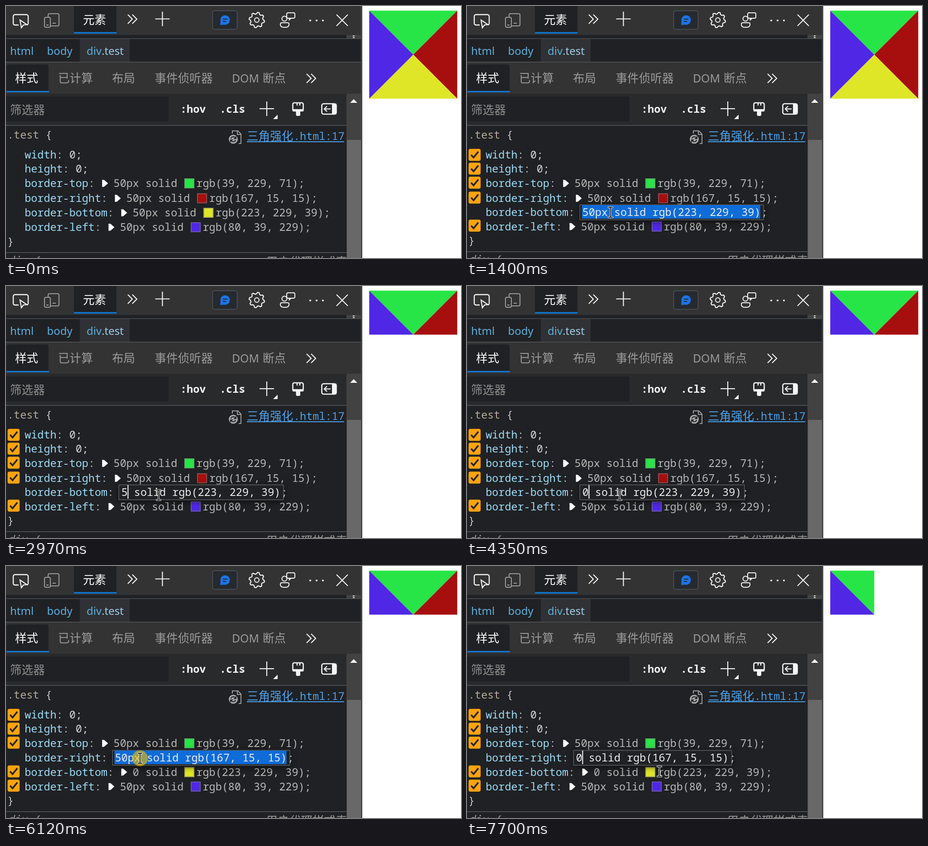
Recreate the animation shown at these times as an HTML page with a canvas. Size 1005x557 px, loop 8000 ms.

```html
<!DOCTYPE html>
<html lang="zh-CN">
<head>
<meta charset="utf-8">
<title>CSS border triangles</title>
<style>
  html, body { margin: 0; width: 100%; height: 100%; overflow: hidden; background: #fff; }
  canvas { display: block; }
</style>
</head>
<body>
<canvas id="stage" width="1005" height="557"></canvas>
<script>
const ctx = document.getElementById('stage').getContext('2d');
const LOOP = 8000;
const CW = 14.07; // width of one code character
const MONO = '23.45px "Noto Sans Mono", monospace';
const MONO_BOLD = 'bold ' + MONO;
const CJK = '25.6px "Noto Sans CJK SC", "Noto Sans CJK", sans-serif';
const SANS = '24px "Noto Sans", sans-serif';
const DARK = '#202124', BAR = '#333334', LINE = '#4b4c4f', WHITE = '#f4f4f4';
const GREY = '#9c9c9c', NAME = '#9bdcf8', VALUE = '#b9b9b9', BLUE = '#0f78d4';
const GREEN = 'rgb(39,229,71)', RED = 'rgb(167,15,15)';
const YELLOW = 'rgb(223,229,39)', VIOLET = 'rgb(80,39,229)';

function rect(x, y, w, h, color) {
  ctx.fillStyle = color;
  ctx.fillRect(x, y, w, h);
}

function round(x, y, w, h, r, fill, stroke, lw = 2) {
  ctx.beginPath();
  ctx.roundRect(x, y, w, h, r);
  if (fill) { ctx.fillStyle = fill; ctx.fill(); }
  if (stroke) { ctx.strokeStyle = stroke; ctx.lineWidth = lw; ctx.stroke(); }
}

function trace(pts, close) {
  ctx.beginPath();
  for (let i = 0; i < pts.length; i += 2) ctx.lineTo(pts[i], pts[i + 1]);
  if (close) ctx.closePath();
}

function line(pts, color = WHITE, lw = 2.2) {
  trace(pts);
  ctx.strokeStyle = color;
  ctx.lineWidth = lw;
  ctx.stroke();
}

function poly(pts, color) {
  trace(pts, true);
  ctx.fillStyle = color;
  ctx.fill();
}

function disc(x, y, r, fill, stroke, lw = 2) {
  ctx.beginPath();
  ctx.arc(x, y, r, 0, 7);
  if (fill) { ctx.fillStyle = fill; ctx.fill(); }
  if (stroke) { ctx.strokeStyle = stroke; ctx.lineWidth = lw; ctx.stroke(); }
}

function text(s, x, y, color, font = MONO) {
  ctx.font = font;
  ctx.fillStyle = color;
  ctx.fillText(s, x, y);
}

function plus(x, y, r) {
  line([x - r, y, x + r, y]);
  line([x, y - r, x, y + r]);
}

function chevrons(x, y) {
  for (const dx of [0, 10]) line([x + dx, y, x + 10 + dx, y + 10, x + dx, y + 20]);
}

function gear(x, y) {
  ctx.beginPath();
  for (let i = 0; i < 32; i++) {
    const a = (i + 0.5) / 32 * Math.PI * 2, r = i % 4 < 2 ? 17 : 13.5;
    ctx.lineTo(x + r * Math.cos(a), y + r * Math.sin(a));
  }
  ctx.closePath();
  ctx.strokeStyle = WHITE;
  ctx.lineWidth = 2.2;
  ctx.stroke();
  disc(x, y, 5, null, WHITE);
}

function topBar() {
  rect(0, 0, 785, 64, BAR);
  rect(150, 0, 94, 61, DARK);
  rect(150, 57.6, 94, 3.4, BLUE);
  // inspect
  round(16, 19, 33, 23, 4, null, WHITE, 2.4);
  poly([28, 28, 48, 38, 43, 50, 28, 49], BAR);
  trace([31, 31, 46, 41, 38.5, 42, 34, 48], true);
  ctx.fillStyle = BAR; ctx.fill();
  ctx.strokeStyle = WHITE; ctx.lineWidth = 2.2; ctx.stroke();
  // devices
  round(93, 17, 24, 27, 3, null, GREY);
  round(85, 25, 13, 22, 3, BAR, GREY);
  line([89, 42, 94, 42], GREY, 2);
  line([103, 38, 110, 38], GREY, 2);
  text('元素', 170, 40, '#fff', '500 ' + CJK);
  chevrons(269, 19);
  plus(345.5, 28.5, 16);
  // messages
  round(456.5, 10.5, 54, 41, 4, '#26292e', '#51555c', 1.5);
  disc(484, 31, 10.5, '#1a73e8');
  poly([474, 33, 473, 42, 484, 41], '#1a73e8');
  line([479, 29, 489, 29], '#26292e', 2);
  line([479, 34, 486, 34], '#26292e', 2);
  gear(554, 31);
  // feedback
  disc(615, 28, 5.5, null, WHITE);
  round(606, 37, 19, 10, [3, 3, 6, 6], null, WHITE);
  round(620, 15, 18, 12, 3, null, WHITE);
  poly([624, 26, 632, 26, 625, 33], WHITE);
  for (const x of [672, 686, 700]) disc(x, 32, 2.1, WHITE);
  line([730, 19, 755, 44]);
  line([755, 19, 730, 44]);
}

function toolbars() {
  rect(0, 64, 752, 9, DARK);
  rect(752, 64, 33, 9, '#424242');
  poly([765, 67, 768, 64.5, 771, 67], WHITE);
  poly([765, 69, 768, 71.5, 771, 69], WHITE);
  rect(0, 71.4, 785, 1.6, LINE);

  rect(0, 73, 785, 50, DARK);
  rect(163, 73, 110, 50, '#2f3134');
  text('html', 9, 108, '#5cb0e0', SANS);
  text('body', 90.5, 108, '#5cb0e0', SANS);
  text('div', 178, 108, '#5cb0e0', SANS);
  text('.test', 178 + ctx.measureText('div').width, 108, '#9dcdea', SANS);
  rect(0, 123, 785, 2, LINE);

  rect(0, 125, 785, 69, BAR);
  round(1, 129, 93, 60, [4, 4, 0, 0], DARK);
  rect(1, 187.6, 94, 3.2, BLUE);
  text('样式', 20, 169, '#fff', '500 ' + CJK);
  text('已计算', 115, 169, GREY, CJK);
  text('布局', 234, 169, GREY, CJK);
  text('事件侦听器', 328.5, 169, GREY, CJK);
  text('DOM', 499, 169, GREY, '24.8px "Noto Sans", sans-serif');
  text('断点', 567, 169, GREY, CJK);
  chevrons(664, 150);

  rect(0, 194, 752, 70, '#292a2c');
  round(-4, 200, 363, 55, 4, DARK);
  text('筛选器', 9, 239, '#8e8e8e', CJK);
  text(':hov', 385, 236, WHITE, MONO_BOLD);
  text('.cls', 472, 236, WHITE, MONO_BOLD);
  plus(576, 227, 16);
  poly([600, 240, 600, 250, 590, 250], WHITE);
  // brush
  round(633.5, 214, 23, 18, 3, null, WHITE, 2.6);
  rect(633, 228, 24, 5, WHITE);
  line([643, 214, 643, 220], WHITE, 2.4);
  line([649, 214, 649, 220], WHITE, 2.4);
  round(640.5, 231, 9.5, 12, 3, WHITE);
  // sidebar toggle
  round(697.5, 216, 32, 23, 4, null, WHITE, 2.6);
  rect(720, 216, 10, 23, WHITE);
  line([717, 227.5, 703, 227.5], WHITE, 2.2);
  line([709, 221.5, 703, 227.5, 709, 233.5], WHITE, 2.2);
}

function scrollbar() {
  rect(752, 194, 33, 363, '#424242');
  poly([760, 214, 768, 206, 776, 214], WHITE);
  rect(753, 296, 31, 261, '#686868');
  rect(784, 0, 3, 557, '#47484a');
}

function ruleHead() {
  text('.test', 3, 293, '#b7aa98');
  text('{', 3 + 6 * CW, 293, '#c8c8c8');
  // linked file
  line([500, 282, 500, 276, 512, 276, 519, 283, 519, 304, 514, 304], GREY, 2);
  line([511, 276, 511, 284, 519, 284], GREY, 2);
  disc(502, 294.5, 10, '#a6a6a6');
  for (const a of [0.3, Math.PI + 0.3]) {
    ctx.beginPath();
    ctx.arc(502, 294.5, 5.5, a, a + 2.3);
    ctx.strokeStyle = DARK; ctx.lineWidth = 2.2; ctx.stroke();
  }
  line([508, 288, 508, 293, 503, 293], DARK, 2);
  line([496, 301, 496, 296, 501, 296], DARK, 2);
  text('三角强化', 532, 297, '#4ba0ea', '300 ' + CJK);
  text('.html:17', 635, 296, '#4ba0ea');
  rect(532, 299, 215, 2, '#4ba0ea');
}

const rows = [
  { name: 'width', val: '0', base: 337, box: 329 },
  { name: 'height', val: '0', base: 368, box: 359.5 },
  { name: 'border-top', rgb: 'rgb(39, 229, 71)', color: GREEN, base: 400, box: 390.5 },
  { name: 'border-right', rgb: 'rgb(167, 15, 15)', color: RED, base: 433, box: 423.5 },
  { name: 'border-bottom', rgb: 'rgb(223, 229, 39)', color: YELLOW, base: 465, box: 455.5 },
  { name: 'border-left', rgb: 'rgb(80, 39, 229)', color: VIOLET, base: 497, box: 487 }
];
const NAME_X = 41.2;

function checkbox(y) {
  round(3.5, y - 13.3, 26.6, 26.6, 4, '#ffa30c');
  line([9, y, 14.5, y + 6, 25, y - 7], '#26272a', 3.6);
}

function swatch(x, y, color) {
  rect(x, y, 22, 22, color);
  ctx.strokeStyle = 'rgba(128,128,128,.6)';
  ctx.lineWidth = 1.8;
  ctx.strokeRect(x + 0.9, y + 0.9, 20.2, 20.2);
}

function property(row, size, dy) {
  const y = row.base + dy;
  let x = NAME_X;
  text(row.name, x, y, NAME);
  x += row.name.length * CW;
  text(':', x, y, VALUE);
  if (row.val) {
    text(row.val + ';', x + 2 * CW, y, '#d6d6d6');
    return;
  }
  poly([x + 30.5, y - 16, x + 35, y - 15.5, x + 43.5, y - 8, x + 35, y - 0.5, x + 30.5, y], '#fff');
  x += 4 * CW - 0.6;
  const head = size + ' solid ';
  text(head, x, y, VALUE);
  x += head.length * CW;
  swatch(x + 1.6, y - 19, row.color);
  text(row.rgb + ';', x + 2 * CW, y, VALUE);
}

function editor(row, edit, t) {
  const y = row.base - 1, x = NAME_X + row.name.length * CW + 29.6;
  const value = edit.size + ' solid ' + row.rgb, w = value.length * CW;
  text(row.name, NAME_X, y, NAME);
  text(':', NAME_X + row.name.length * CW, y, VALUE);
  ctx.save();
  ctx.shadowColor = 'rgba(0,0,0,.6)';
  ctx.shadowBlur = 14;
  ctx.shadowOffsetY = 3;
  round(x - 5, y - 25, w + 13, 34, 1, DARK);
  ctx.restore();
  round(x - 4.5, y - 24.5, w + 12, 33, 1, DARK, '#525254', 1.8);
  if (edit.selected) rect(x, y - 24, w, 30, '#0f6cd8');
  text(value, x + 1, y, '#ececec');
  text(';', x + w + 2, y, VALUE);
  const off = [[3390, 3890], [4860, 5080], [6690, 6900]].some(([a, b]) => t >= a && t < b);
  if (!edit.selected && !off) rect(x + edit.size.length * CW + 0.7, y - 24, 2, 30, '#fff');
}

// Latest entry of a [time, value] list
const at = (list, t) => list.reduce((v, [start, next]) => t >= start ? next : v, list[0][1]);

const bottomSize = [[0, '50px'], [2720, '50p'], [2810, '50'], [2900, '5'], [2990, ''], [4350, '0']];
const rightSize = [[0, '50px'], [6900, '50p'], [7070, '50'], [7230, '5'], [7310, ''], [7650, '0']];
const bottomWidth = [[0, 97.2], [2720, 0], [3090, 2], [4350, 0]];
const rightWidth = [[0, 97.2], [6900, 0], [7400, 2], [7650, 0]];
const clicks = [[1130, 1300], [1780, 1930], [5180, 5330], [6100, 6220]];

const path = [
  [200, 815, 545], [810, 310, 443], [980, 310, 443], [1150, 317, 456], [1730, 317, 456],
  [1850, 320, 457], [1990, 320, 457], [2390, 337, 462], [4350, 337, 462], [4650, 328, 470],
  [5080, 328, 470], [5240, 290, 429], [5400, 290, 429], [5640, 293, 428], [5800, 293, 428],
  [6000, 296, 425], [6200, 296, 425], [6360, 425, 454]
];

function mouseAt(t) {
  let i = 0;
  while (i < path.length - 2 && t >= path[i + 1][0]) i++;
  const [t0, x0, y0] = path[i], [t1, x1, y1] = path[i + 1];
  const p = Math.min(1, (t - t0) / (t1 - t0)), e = p * p * (3 - 2 * p);
  return [x0 + (x1 - x0) * e, y0 + (y1 - y0) * e];
}

function mouse(t, x, y, beam) {
  if (clicks.some(([a, b]) => t >= a && t < b)) disc(x, y, 17.5, 'rgba(235,190,0,.62)');
  if (!beam) {
    trace([x, y, x, y + 24, x + 5.5, y + 19, x + 9.5, y + 28.5, x + 13.5, y + 27,
      x + 9.5, y + 17.5, x + 17, y + 17], true);
    ctx.fillStyle = '#fff'; ctx.fill();
    ctx.strokeStyle = '#111'; ctx.lineWidth = 1.2; ctx.stroke();
    return;
  }
  for (const [color, lw, k] of [['#fff', 3.6, 0.8], ['#111', 1.8, 0]]) {
    line([x, y - 11 - k, x, y + 11 + k], color, lw);
    line([x - 5 - k, y - 11, x + 5 + k, y - 11], color, lw);
    line([x - 5 - k, y + 11, x + 5 + k, y + 11], color, lw);
  }
}

function box(top, right, bottom, left) {
  const x0 = 802.3, y0 = 10.3, cx = x0 + left, cy = y0 + top;
  const x1 = cx + right, y1 = cy + bottom;
  poly([x0, y0, x1, y0, cx, cy], GREEN);
  if (right) poly([x1, y0, x1, y1, cx, cy], RED);
  if (bottom) poly([x0, y1, x1, y1, cx, cy], YELLOW);
  poly([x0, y0, x0, y1, cx, cy], VIOLET);
}

function draw(t) {
  rect(0, 0, 1005, 557, '#fff');
  rect(0, 264, 752, 293, DARK);
  topBar();
  toolbars();
  rect(0, 263, 752, 2, LINE);
  ruleHead();

  const [mx, my] = mouseAt(t);
  const hover = t >= 200 && mx < 752;
  const active = t < 1200 ? -1 : t < 5250 ? 4 : 3;
  const sizes = { 3: at(rightSize, t), 4: at(bottomSize, t) };
  rows.forEach((row, i) => {
    if (i === active) return;
    const dy = active >= 0 && i > active ? -1.5 : 0;
    property(row, sizes[i] ?? '50px', dy);
    if (hover) checkbox(row.box + dy);
  });

  const dy = active < 0 ? 0 : -2;
  text('}', 3, 529 + dy, '#c8c8c8');
  rect(0, 544 + dy, 752, 2, LINE);
  text('div {', 4, 570 + dy, GREY, 'italic ' + MONO);
  text('用户代理样式表', 570, 574 + dy, GREY, 'italic 300 ' + CJK);
  if (hover && active < 0) plus(712, 508, 16);
  if (active >= 0) {
    const selected = active === 4 ? t < 1850 : t < 6200;
    editor(rows[active], { size: sizes[active], selected }, t);
  }

  scrollbar();
  box(97.2, at(rightWidth, t), at(bottomWidth, t), 97.2);
  if (t >= 200) mouse(t, mx, my, t >= 1100);
}

const start = performance.now();
function tick() {
  draw((performance.now() - start) % LOOP);
  requestAnimationFrame(tick);
}
tick();
</script>
</body>
</html>
```
